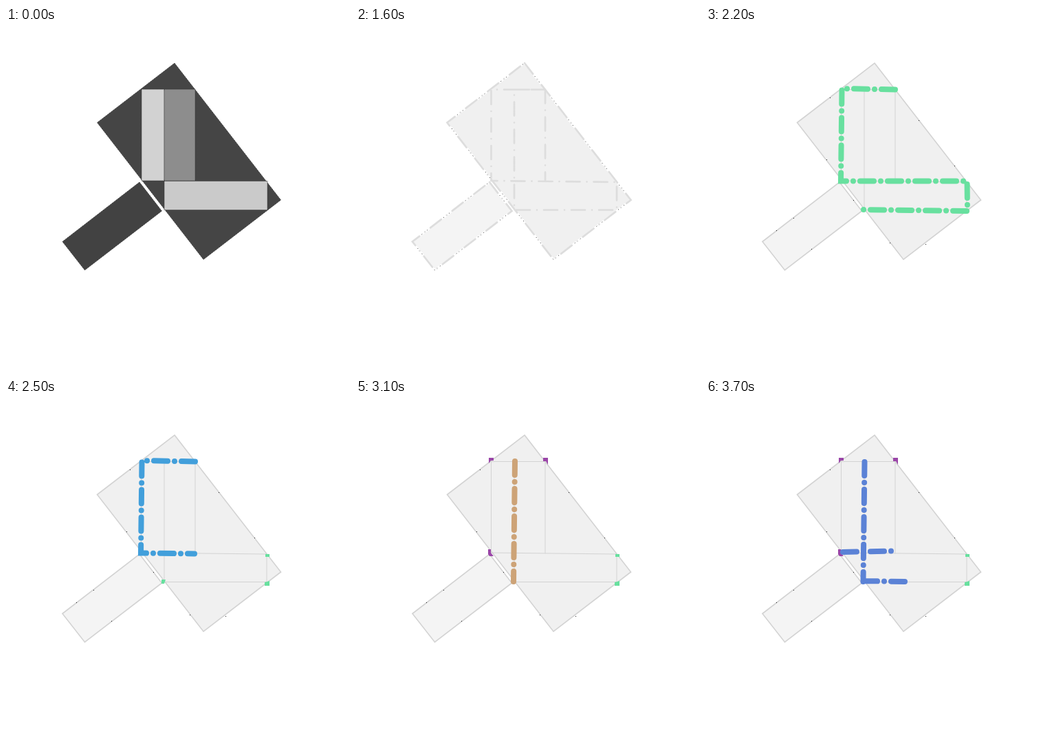
An HTML page with a canvas that plays this animation: 500 by 500 pixels, repeating every 4 s.

```html
<!DOCTYPE html>
<html>
<head>
<meta charset="utf-8">
<style>
html, body { margin: 0; width: 100%; height: 100%; overflow: hidden; background: #fff; }
canvas { display: block; width: 100vw; height: 100vh; }
</style>
</head>
<body>
<canvas id="stage" width="500" height="500"></canvas>
<script>
const g = document.getElementById('stage').getContext('2d');
const path = d => new Path2D(d);

const head = path('M245 51L399.5 250L287 336.5L132.5 137.5Z');
const handle = path('M194 224L226.5 266L114.5 352L82 310.5Z');
const inner = path('M275 89.5H196.5V222L379 224V264.5H230V89.5H275M275 89.5V223');
const DASH = [20, 10, 0, 10];

// Each step: start time, colour, route of the thick dashed line
const steps = [
  [2200, '#68e09f', 'M275 89.5L197.5 88V90L196 222.5H379.5L380 266L229 264'],
  [2500, '#429fdb', 'M275 89.5L197.5 88V90L196 222.5L274 223.5'],
  [2800, '#9a46a8', 'M196 222L197 88H275.5L275 223Z'],
  [3100, '#cda377', 'M231 89L229 264'],
  [3400, '#d6707b', 'M230 89.5L228.5 264H274'],
  [3700, '#5b82d6', 'M199 221L273 219.5M230.5 90L228.5 264M229 263L289 264']
].map(([at, color, d]) => [at, color, path(d)]);

const greenBits = path('M377 224h6v4h-6zM376 265l7-2v7h-7zM226 261h6l-2 6h-4z');
const purpleBits = path('M193 92v-8h7v4h-4zM272 84h7v10l-3-5h-4zM192 217h4v5l4 5h-6l-2-3z');
const specks = [[180, 101], [309, 134], [361, 200], [175, 191], [267, 312],
  [319, 314], [153, 321], [214, 250], [102, 294], [127, 276]];

function fill(shape, color) {
  g.fillStyle = color;
  g.fill(shape);
}

function stroke(shape, color, width, dash = [], cap = 'round') {
  g.strokeStyle = color;
  g.lineWidth = width;
  g.lineCap = cap;
  g.setLineDash(dash);
  g.stroke(shape);
}

function solid() {
  fill(head, '#454545');
  fill(handle, '#424242');
  for (const s of [head, handle]) stroke(s, '#333', 1, [1, 1], 'butt');
  const blocks = [['#d2d2d2', 197, 89, 33, 133], ['#8d8d8d', 230, 89, 45, 133],
    ['#cacaca', 230, 222.5, 150, 42]];
  for (const [color, ...box] of blocks) {
    const block = new Path2D();
    block.rect(...box);
    fill(block, color);
    stroke(block, '#333', 1, [1, 1], 'butt');
  }
}

function sketch(t) {
  fill(head, '#f0f0f0');
  fill(handle, '#f4f4f4');
  const outer = [head, handle];
  if (t < 1600) {
    for (const s of [...outer, inner]) stroke(s, '#fff', 8, DASH);
    for (const s of outer) stroke(s, '#222', 1, [0, 24.5, 1, 9, 1, 4.5], 'butt');
  } else if (t < 1900) {
    for (const s of outer) {
      stroke(s, '#fff', 2.5);
      stroke(s, '#222', 1, [0, 24, 1, 9, 1, 5], 'butt');
      stroke(s, '#ddd', 2.7, DASH);
    }
    stroke(inner, '#ddd', 2.7, DASH);
  } else {
    for (const s of outer) stroke(s, '#d3d3d3', 1.6);
    stroke(inner, '#d3d3d3', 1);
    g.fillStyle = '#222';
    for (const [x, y] of specks) g.fillRect(x, y, 1, 1);
  }
}

function draw(t) {
  g.fillStyle = '#fff';
  g.fillRect(0, 0, 500, 500);
  if (t < 1000) return solid();
  sketch(t);
  if (t >= 2500) fill(greenBits, '#68e09f');
  if (t >= 3100) fill(purpleBits, '#9a46a8');
  const step = steps.filter(([at]) => t >= at).pop();
  if (step) stroke(step[2], step[1], 8, DASH);
}

const start = performance.now();
function tick() {
  draw((performance.now() - start) % 4000);
  requestAnimationFrame(tick);
}
tick();
</script>
</body>
</html>
```
